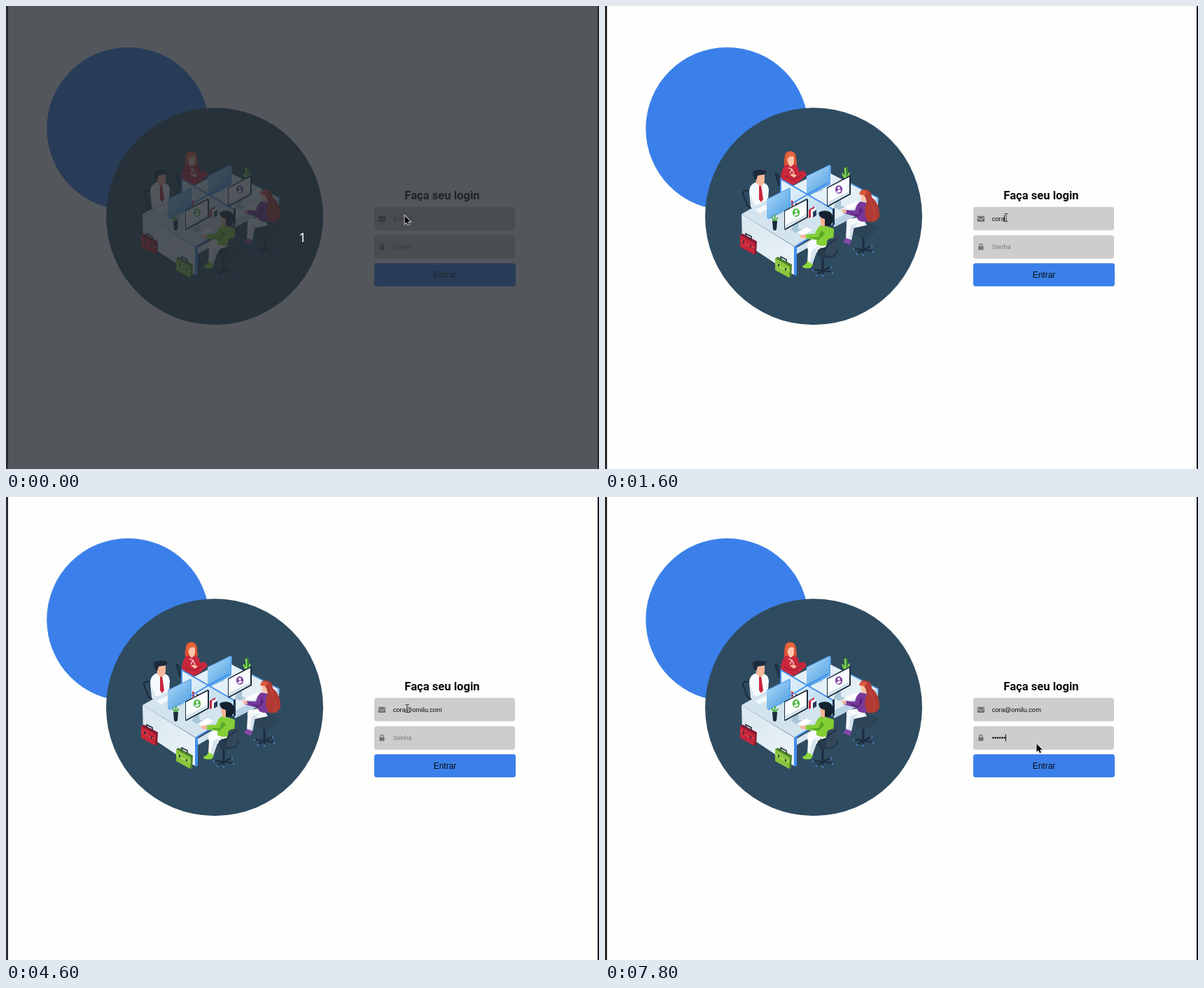
Write an HTML page with a canvas that moves like this. It is 847 px wide and 661 px high and loops after 8 s.

```html
<!DOCTYPE html>
<html lang="pt">
<head>
<meta charset="utf-8">
<title>Login</title>
<style>
html, body { margin: 0; width: 100%; height: 100%; overflow: hidden; background: #fefefd; }
canvas { display: block; width: 847px; height: 661px; }
</style>
</head>
<body>
<canvas id="stage" width="847" height="661"></canvas>
<script>
const ctx = document.getElementById('stage').getContext('2d');
const LOOP = 8000;
const SANS = '"Liberation Sans", Arial, sans-serif';
const BLUE = '#3b80ea', NAVY = '#2f4b60', DARK = '#1c2b3c', SKIN = '#f6b99b';
const EMAIL = 'cora@omilu.com';

// [time, typed characters, caret visible]
const mailKeys = [[0, 0, 0], [100, 0, 1], [700, 0, 0], [1200, 2, 1], [1400, 3, 1], [1600, 4, 1],
  [2200, 5, 1], [2500, 6, 1], [2700, 7, 1], [3000, 9, 1], [3200, 10, 1], [3500, 11, 1],
  [3700, 12, 1], [4000, 14, 1], [4600, 14, 0]];
const passKeys = [[0, 0, 0], [5200, 0, 1], [5500, 1, 1], [5700, 2, 1], [6000, 3, 1],
  [6600, 3, 0], [7000, 4, 1], [7400, 5, 1], [7600, 6, 1]];
// [time, x, y, arrow shape]
const pointer = [[0, 569.5, 299.5, 1], [100, 571, 301, 0], [400, 573, 302, 0], [4700, 578, 306, 0],
  [4800, 598, 323, 1], [4900, 627, 346, 0], [5000, 636, 355, 0], [5100, 620, 347, 0],
  [5200, 613.5, 343.5, 0], [5800, 612.5, 342.5, 0], [7800, 616.5, 352.5, 1]];

const at = (keys, t) => keys.filter(k => k[0] <= t).pop();

function fill(color, d) {
  ctx.fillStyle = color;
  ctx.fill(new Path2D(d));
}
function line(color, width, d) {
  ctx.strokeStyle = color;
  ctx.lineWidth = width;
  ctx.stroke(new Path2D(d));
}
function disc(color, x, y, rx, ry = rx) {
  ctx.fillStyle = color;
  ctx.beginPath();
  ctx.ellipse(x, y, rx, ry, 0, 0, 7);
  ctx.fill();
}
function box(color, x, y, w, h, r) {
  ctx.fillStyle = color;
  ctx.beginPath();
  ctx.roundRect(x, y, w, h, r);
  ctx.fill();
}
function text(s, x, y, font, color, align = 'left') {
  ctx.font = font;
  ctx.fillStyle = color;
  ctx.textAlign = align;
  ctx.fillText(s, x, y);
}
function fade(x0, y0, x1, y1, a, b) {
  const g = ctx.createLinearGradient(x0, y0, x1, y1);
  g.addColorStop(0, a);
  g.addColorStop(1, b);
  return g;
}

function desks() {
  // far desk
  fill('#e4eff5', 'M268 257L322 229V239L390 274V284L327 314Z');
  fill('#b9d3e4', 'M327 305L390 274V284L327 316Z');
  line('#57a0ee', 1.5, 'M322 239V229L289 246M350 253L390 274V280');
  // near desk
  fill(fade(196, 300, 270, 370, '#d8e6ef', '#eaf3f8'), 'M195 297L271 344V384L262 380L196 336Z');
  fill('#d3e4ee', 'M195 297L254 264L327 308L272 344Z');
  fill('#f3f8fb', 'M214 291L229 284L236 288L221 296Z');
  fill('#d4e4ee', 'M274 345L300 330V339L274 354Z');
  fill('#3f8cef', 'M270 344L274 342V384L270 385Z');
  line('#3f8cef', 2, 'M272 343L304 324');
}

function monitorBack(x, y) {
  fill('#b8cfdd', `M${x + 13} ${y + 30}L${x + 23} ${y + 25}V${y + 36}L${x + 11} ${y + 40}Z`);
  fill(fade(x, y, x + 30, y + 30, '#b3dcf8', '#5ea9e6'),
    `M${x} ${y + 16}L${x + 32} ${y}Q${x + 34} ${y} ${x + 34} ${y + 2}V${y + 27}L${x + 3} ${y + 44}L${x} ${y + 42}Z`);
  line('#4c9cec', 1, `M${x} ${y + 16}L${x + 33} ${y}V${y + 28}L${x + 2} ${y + 44}`);
}

function monitorFront(x, y, color) {
  fill('#a9c6d9', `M${x + 13} ${y + 37}L${x + 20} ${y + 33}V${y + 43}L${x + 26} ${y + 45}L${x + 17} ${y + 49}L${x + 10} ${y + 45}Z`);
  fill(DARK, `M${x} ${y + 17}L${x + 32} ${y}L${x + 34} ${y + 1}V${y + 27}L${x + 1} ${y + 45}L${x} ${y + 43}Z`);
  fill('#f8fcfe', `M${x + 1} ${y + 18}L${x + 32} ${y + 2}V${y + 23}L${x + 1} ${y + 39}Z`);
  fill('#dcebf4', `M${x + 1} ${y + 39}L${x + 32} ${y + 23}V${y + 26}L${x + 1} ${y + 43}Z`);
  disc(color, x + 17, y + 20, 5.2, 6);
  disc('#fff', x + 17, y + 18, 1.7, 2);
  fill('#fff', `M${x + 13.5} ${y + 24}Q${x + 16} ${y + 19} ${x + 20.5} ${y + 21}Q${x + 18} ${y + 26} ${x + 13.5} ${y + 24}Z`);
}

function folders(x, y) {
  fill('#c5283d', `M${x} ${y + 5}L${x + 8} ${y}V${y + 13}L${x} ${y + 17}Z`);
  fill('#f7fafc', `M${x + 3} ${y + 5}L${x + 10} ${y + 2}V${y + 12}L${x + 3} ${y + 17}Z`);
  fill('#263c58', `M${x + 6} ${y + 8}L${x + 11} ${y + 5}V${y + 13}L${x + 6} ${y + 16}Z`);
}

function chairBase(x, y) {
  line(DARK, 3, `M${x} ${y - 15}V${y}`);
  line(DARK, 2.2, `M${x - 14} ${y + 1}L${x + 14} ${y + 5}M${x - 9} ${y + 8}L${x + 12} ${y - 3}M${x} ${y}V${y + 9}`);
  for (const [dx, dy] of [[-14, 2], [14, 6], [-9, 9], [12, -2], [0, 10]]) disc('#4375a8', x + dx, y + dy, 1.5, 1.7);
}

function bag(x, y, front, dark, light) {
  fill(dark, `M${x} ${y + 2}L${x + 4} ${y}L${x + 24} ${y + 11}L${x + 23} ${y + 29}L${x + 20} ${y + 30}Z`);
  fill(front, `M${x} ${y + 2}L${x + 21} ${y + 14}L${x + 20} ${y + 30}L${x} ${y + 19}Z`);
  line(light, 1, `M${x} ${y + 9}Q${x + 10} ${y + 18} ${x + 21} ${y + 20}`);
  line(DARK, 1.5, `M${x + 8} ${y + 4}V${y}L${x + 16} ${y + 4}V${y + 8}`);
  fill(DARK, `M${x + 4} ${y + 10}l2 1v3l-2-1zM${x + 14} ${y + 16}l2 1v3l-2-1z`);
}

function manWhite() {
  line(DARK, 2, 'M206 264Q196 262 197 269L204 286L216 291');
  fill('#f7fafc', 'M214 252Q207 255 206 264L208 287Q219 296 232 290L234 262Q233 254 226 252Z');
  fill('#dbe7ef', 'M208 270L213 283L230 287L228 291Q216 294 208 287Z');
  fill(SKIN, 'M228 286L237 288L236 292L227 291Z');
  fill('#c7263b', 'M220 256L223 256L226 276L223 280L220 276Z');
  fill(SKIN, 'M214 240H228V249Q227 256 221 257L216 253Z');
  fill(DARK, 'M211 236Q218 232 230 235Q231 241 224 241L218 242L216 249Q211 246 211 236Z');
}

function womanRed() {
  line(DARK, 2, 'M243 239L247 241L251 256M243 239L249 258');
  fill('#d95335', 'M257 213Q258 207 265 207Q273 208 273 217Q275 227 272 233L258 234Q254 227 257 213Z');
  fill('#c9273c', 'M258 227Q252 230 251 246L267 256L277 251L288 241L284 235L277 237Q277 229 271 227Z');
  line('#94192f', 1, 'M256 243L269 248L281 241');
  fill(SKIN, 'M264 241L269 239L274 242L270 245Z');
  fill('#fbc6ad', 'M260 214L270 213V223Q268 230 264 229Q260 224 260 214Z');
  fill('#e8653d', 'M258 218Q259 207 267 208Q272 209 271 216Q264 212 261 219Z');
  line('#ffe4dc', 1.2, 'M262 231L267 233L264 239M267 233L270 239');
}

function womanPurple() {
  chairBase(369, 345);
  fill('#2d4356', 'M354 318L374 309L390 316L385 325L370 332L354 324Z');
  fill('#f4f8fb', 'M367 301L348 304Q344 306 345 313L344 332L351 335L355 317L374 313Z');
  fill('#d5e2ec', 'M362 309L356 315L352 335L348 333L351 313Z');
  fill('#8549a8', 'M344 331L352 334L350 341L340 337Z');
  fill('#783a9a', 'M365 279Q359 282 357 292L341 291V296L359 301L362 306Q372 311 383 305L379 282Z');
  fill(SKIN, 'M344 291L337 290L340 295L345 296Z');
  fill('#59277a', 'M365 285L362 298L347 294L361 301L368 293Z');
  fill('#fbc1a3', 'M365 267H374V278Q369 282 366 277Z');
  fill('#b13a35', 'M364 267Q365 261 373 262Q381 264 381 273Q393 283 392 301Q388 310 376 308Q369 300 372 287Q376 278 370 270Z');
  line('#cc5142', 0.8, 'M374 266Q379 276 382 286Q389 299 382 308');
  fill('#d95a3c', 'M363 269Q364 261 374 264L372 270Z');
}

function manGreen() {
  fill('#f8fbfd', 'M303 331L291 337Q287 341 290 349L289 366L296 369L302 352L320 346Z');
  fill('#d6e4ee', 'M311 340L303 346L296 369L292 368L296 348Z');
  fill('#8ed83d', 'M289 364Q288 369 282 371Q282 376 294 374L297 369Z');
  chairBase(311, 375);
  fill('#263a4c', 'M304 348L326 340L334 350L327 359L309 361L303 354Z');
  fill('#84cf36', 'M310 312Q303 315 300 325L286 326V332L302 334V340Q314 346 326 338L327 318Z');
  fill('#58a825', 'M309 320L305 330L291 330L305 334L314 325Z');
  fill(SKIN, 'M287 326L278 327L280 331L287 332Z');
  fill('#33485b', 'M317 338Q316 332 326 331L332 329Q335 330 334 336L329 353Q323 360 315 355Z');
  line(DARK, 1.5, 'M307 346Q316 348 318 341L330 333');
  fill('#f7b391', 'M307 300H318V312Q314 317 309 313Z');
  fill('#14212f', 'M305 295Q310 291 319 293Q327 296 326 307Q322 316 314 314L314 304Q306 303 305 295Z');
}

function office() {
  manWhite();
  womanRed();
  desks();
  fill('#3a7f39', 'M342 249L338 239L342 240L341 231L346 229L347 237L349 240L347 249Z');
  line('#8bdf54', 2, 'M344 248L343 231M344 248L339 239M345 248L349 238');
  monitorBack(288, 227);
  folders(266, 269);
  // partition between the desks
  fill(fade(251, 250, 327, 305, '#e6f3fb', '#b7d8ed'), 'M251 247L327 291V314L251 268Z');
  line('#438fef', 2, 'M251 267V247L327 291M289 269L264 284M289 269L318 253');
  fill('#1d344b', 'M325 290L328 288V312L325 314Z');
  monitorFront(317, 242, '#8248a4');
  fill('#fff', 'M342 287L359 279L365 282L349 291Z');
  womanPurple();
  monitorBack(231, 260);
  line('#4fae46', 2, 'M242 309L238 301M242 309L243 298M242 309L247 302');
  fill(DARK, 'M239 307H246L245 319Q242 322 240 319Z');
  folders(291, 286);
  monitorFront(256, 275, '#51b947');
  fill('#fff', 'M275 323L288 316L296 320L282 328Z');
  manGreen();
  bag(193, 325, '#c5263a', '#821b32', '#ed5360');
  bag(243, 358, '#8bc63e', '#4c812e', '#d3ee73');
}

function field(y, hint, value, count, caret) {
  box('#cfcdcc', 526, y, 201, 33.5, 3.5);
  const base = y + 20, font = '9.33px ' + SANS;
  const typed = value.slice(0, count);
  text(typed || hint, 552.7, base, font, typed ? '#080808' : '#777');
  if (caret) {
    const w = typed ? ctx.measureText(typed).width : 0;
    ctx.fillStyle = '#111';
    ctx.fillRect(Math.floor(552.7 + w), y + 11.5, 1, 10.5);
  }
}

function icons() {
  box('#747474', 531.7, 299.7, 10.4, 8.2, 1);
  line('#cfcdcc', 1, 'M531.7 301.7L537 305.5L542 301.7');
  box('#747474', 533.3, 343, 7.2, 5.3, 0.8);
  line('#747474', 1.3, 'M534.8 343.5V341.5Q534.8 339.6 536.9 339.6Q539 339.6 539 341.5V343.5');
}

function cursor([, x, y, arrow]) {
  ctx.save();
  ctx.translate(x, y);
  if (arrow) {
    const d = 'M0 0V11.5L2.7 9L4.5 13L6.4 12.2L4.6 8.3H8.3Z';
    line('#eee', 1.6, d);
    fill('#050505', d);
  } else {
    const d = 'M-2.5 -5.5H-.8L0 -5L.8 -5.5H2.5M0 -5V5M-2.5 5.5H-.8L0 5L.8 5.5H2.5';
    line('rgba(240,240,240,.55)', 2.2, d);
    line('#222', 1, d);
  }
  ctx.restore();
}

function draw(t) {
  const mail = at(mailKeys, t), pass = at(passKeys, t);
  ctx.fillStyle = '#fefefd';
  ctx.fillRect(0, 0, 847, 661);
  disc(BLUE, 174.4, 175.1, 116.2);
  disc(NAVY, 298, 300.2, 155);
  office();
  text('Faça seu login', 623, 276, 'bold 16.6px Roboto, sans-serif', '#08090f', 'center');
  field(286.8, 'E-mail', EMAIL, mail[1], mail[2]);
  field(327.2, 'Senha', '••••••', pass[1], pass[2]);
  icons();
  box(BLUE, 526, 367.3, 202, 33, 3.5);
  text('Entrar', 627, 388, '12px ' + SANS, '#080b12', 'center');
  ctx.fillStyle = '#2b2b2e';
  ctx.fillRect(0, 0, 3, 661);
  ctx.fillStyle = '#15151f';
  ctx.fillRect(845, 0, 2, 661);
  if (t < 100) {
    ctx.fillStyle = 'rgba(37,43,49,.79)';
    ctx.fillRect(0, 0, 847, 661);
    text('1', 423.5, 336.5, '18.5px "Noto Sans", sans-serif', '#fff', 'center');
  }
  cursor(at(pointer, t));
}

const start = performance.now();
function tick() {
  draw((performance.now() - start) % LOOP);
  requestAnimationFrame(tick);
}
tick();
</script>
</body>
</html>
```
